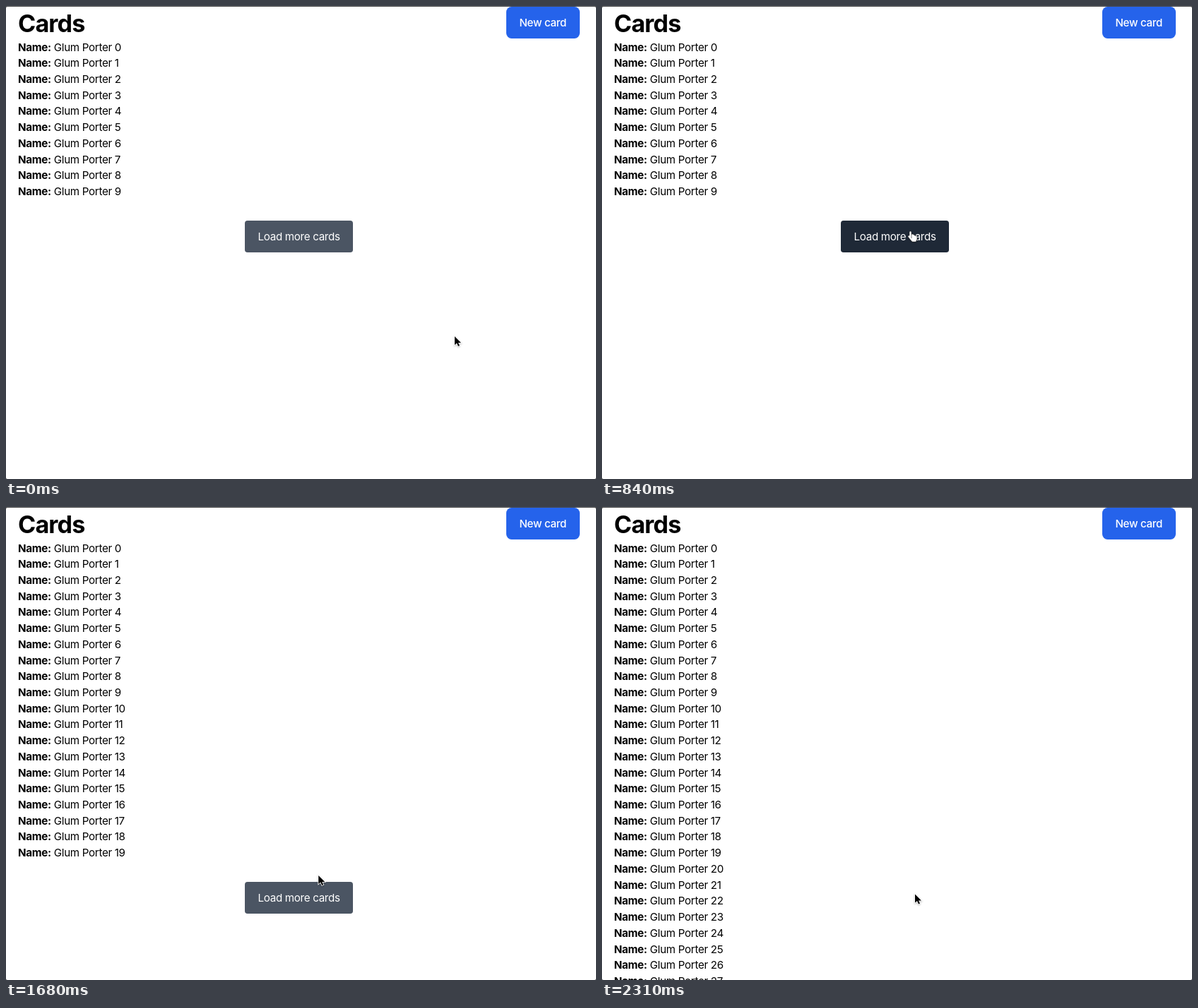
Animation, 835 px wide and 670 px high, one loop 2800 ms. Source, as an HTML page:

```html
<!DOCTYPE html>
<html lang="en">
<head>
<meta charset="utf-8">
<title>Cards</title>
<style>
  html, body { margin: 0; width: 100%; height: 100%; overflow: hidden; }
  svg { display: block; background: #4a4a4a; }
  text { font: 15.15px Inter, "Liberation Sans", sans-serif; letter-spacing: -.02em; }
  text.title { font-size: 34.08px; font-weight: 700; letter-spacing: -.024em; }
  .key { font-weight: 700; }
  .label { fill: #fff; text-anchor: middle; }
  #cursor { filter: drop-shadow(0 1px 1px #0004); }
  #hand { fill: none; stroke-linecap: round; stroke-linejoin: round; }
</style>
</head>
<body>
<svg width="835" height="670" viewBox="0 0 835 670">
  <rect y="1" width="835" height="669" rx="2" fill="#fff"/>
  <text class="title" x="17" y="36.7">Cards</text>
  <rect x="708" y="1" width="104" height="45" rx="7.6" fill="#2563eb"/>
  <text class="label" x="759.8" y="29.2" style="font-weight:500">New card</text>
  <g id="rows"></g>
  <g id="load">
    <rect id="face" x="338" y="304" width="153" height="45" rx="3.8"/>
    <text class="label" x="414.6" y="332.2">Load more cards</text>
  </g>
  <g id="cursor">
    <path id="arrow" stroke="#fff" stroke-width="1.6" paint-order="stroke"
      d="M0 0V12L3 9.5 5 14 7 13 5 9H9Z"/>
    <g id="hand">
      <path id="fingers" stroke="#222" stroke-width="3.4" d="M0 1V8L-2 7 3 13H7L8 7V11L5 6V11L3 5V11"/>
      <use href="#fingers" id="skin"/>
    </g>
  </g>
</svg>
<script>
const LOOP = 2800, STEP = 70, ROW = 22.72, PAGE = 10;
const $ = id => document.getElementById(id);

const start = { x: 635, y: 468 };
const moves = [
  { from: 0, to: 350, x: 436, y: 276 },
  { from: 350, to: 540, x: 436.5, y: 319.5 },
  { from: 1400, to: 1780, x: 443, y: 548.5 }
];
const loads = [910, 2310];

const ease = u => Math.sin(Math.PI / 2 * Math.min(1, Math.max(0, u))) ** 1.4;

function pointerAt(t) {
  return moves.reduce((p, m) => {
    const k = ease((t - m.from) / (m.to - m.from));
    return { x: p.x + (m.x - p.x) * k, y: p.y + (m.y - p.y) * k };
  }, start);
}

const show = (el, on) => el.style.display = on ? "" : "none";

$("rows").innerHTML = Array.from({ length: 3 * PAGE }, (_, i) =>
  `<text x="17.1" y="${63.5 + i * ROW}"><tspan class="key">Name:</tspan> Glum Porter ${i}</text>`
).join("");
const rows = [...$("rows").children];

// White fill strokes over the slightly wider dark outline
const skin = $("fingers").cloneNode();
skin.removeAttribute("id");
skin.setAttribute("stroke", "#fff");
skin.setAttribute("stroke-width", 2.4);
$("skin").replaceWith(skin);

function draw(now) {
  const t = Math.floor(now % LOOP / STEP) * STEP;
  const pages = loads.filter(at => t >= at).length;
  const shift = Math.round(pages * PAGE * ROW);
  const { x, y } = pointerAt(t);
  const hover = x > 338 && x < 491 && y > 304 + shift && y < 349 + shift;

  rows.forEach((row, i) => show(row, i < (pages + 1) * PAGE));
  $("load").setAttribute("transform", `translate(0 ${shift})`);
  $("face").setAttribute("fill", hover ? "#1f2937" : "#4b5563");
  $("cursor").setAttribute("transform", `translate(${x} ${y})`);
  show($("hand"), hover);
  show($("arrow"), !hover);
  requestAnimationFrame(draw);
}
draw(0);
</script>
</body>
</html>
```
